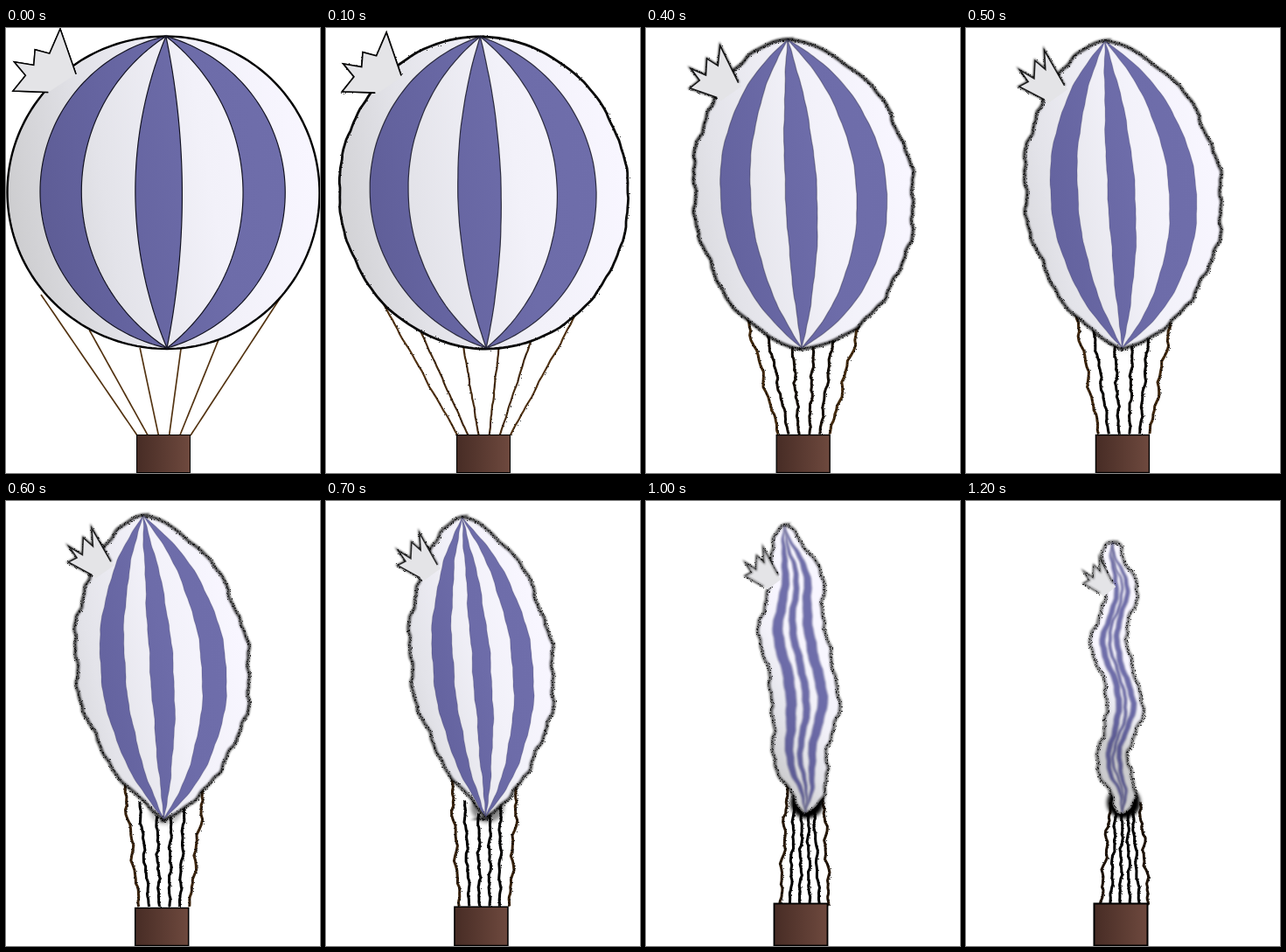
An HTML page with a canvas that plays this animation: 359x509 px, repeating every 1250 ms.

```html
<!DOCTYPE html>
<html lang="en">
<head>
<meta charset="utf-8">
<title>Deflating balloon</title>
<style>
  html, body { margin: 0; width: 100%; height: 100%; overflow: hidden; background: #fff; }
  canvas { display: block; width: 359px; height: 509px; }
</style>
</head>
<body>
<canvas id="stage" width="359" height="509"></canvas>
<script>
const ctx = document.getElementById('stage').getContext('2d');
const LOOP = 1250, STEP = 50, LAST = 24;
const { PI, sin, cos, exp, sqrt, min, max, abs, hypot } = Math;

const mix = (a, b, t) => a + (b - a) * t;
const clamp = x => max(0, min(1, x));
const noise = (v, seed) =>
  (sin(27 * v + seed) + .7 * sin(61 * v + seed * 2.3) + .4 * sin(137 * v + seed * 4.1)) / 1.5;

function random(seed) {
  return () => (seed = seed * 16807 % 2147483647) / 2147483647;
}

// Shape of the envelope; k runs from 0 (full) to 1 (empty).
function envelope(k) {
  const topX = 155 + 64 * (k - .66) ** 2 + 5 * k ** 8;
  const endX = 181 + 3 * cos(9 * k);
  const mid = 181 - 8 * k * k - clamp(1 - 5 * k);
  return {
    topX, endX, mid,
    half: 178.5 - 158.5 * k + 9 * min(0, sin(2 * PI * k)),
    top: 9.5 + 20 * k ** 1.5 + 18 * k ** 10,
    end: 367 - 9 * clamp(3 * k - 1.3),
    bulge: mid - (topX + endX) / 2,
    pinch: .5 + .45 * exp(-(((k - .6) / .2) ** 2)) - .25 * k ** 6,
    wave: 8 * clamp(2.4 * k - 1.4),
    rough: 2.6 * clamp(k * 4)
  };
}

// Height of a circular arc over a chord, scaled to 1 at the centre.
function arc(s, sag) {
  const a = max(sag, .02), r = (1 + a * a) / (2 * a);
  return (sqrt(r * r - s * s) - r + a) / a;
}

function trace(points, close) {
  ctx.beginPath();
  for (const [x, y] of points) ctx.lineTo(x, y);
  if (close) ctx.closePath();
}

function blurred(px, paint) {
  ctx.filter = px > .05 ? `blur(${px}px)` : 'none';
  paint();
  ctx.filter = 'none';
}

// Grainy dots scattered along a line.
function speckle(points, density, spread) {
  const rnd = random(77);
  ctx.fillStyle = 'rgba(0, 0, 0, .8)';
  for (let i = 1; i < points.length; i++) {
    const [x0, y0] = points[i - 1], [x1, y1] = points[i];
    for (let n = hypot(x1 - x0, y1 - y0) * density; n > rnd(); n--) {
      const t = rnd(), jitter = () => (rnd() - .5) * 2 * spread;
      ctx.fillRect(Math.round(mix(x0, x1, t) + jitter()), Math.round(mix(y0, y1, t) + jitter()), 1, 1);
    }
  }
}

function side(fn, steps = 100) {
  return Array.from({ length: steps + 1 }, (_, i) => fn((1 - cos(PI * i / steps)) / 2));
}

function spine(b, v) {
  const sway = b.wave * cos(2 * PI * (v - .16) / .43) * min(1, 8 * v, 8 * (1 - v));
  return mix(b.topX, b.endX, v) + sway;
}

function hull(b) {
  const edge = dir => side(v => {
    const q = max(0, 1 - (2 * v - 1) ** 2);
    const power = v < .5 ? min(b.pinch, .62) : b.pinch;
    const x = spine(b, v) + b.bulge * sqrt(q) + dir * b.half * q ** power;
    return [x + b.rough * noise(v, 2 + dir), mix(b.top, b.end, v) + b.rough * .4 * noise(v, 5 + dir)];
  });
  return edge(-1).concat(edge(1).reverse());
}

function stripeEdge(b, u, wobble, seed) {
  const bow = u * b.half + b.bulge;
  const sag = min(1, max(abs(bow) / (b.end - b.top) * 2, b.wave / 9));
  return side(v => [
    spine(b, v) + bow * arc(2 * v - 1, sag) + wobble * noise(v, seed),
    mix(b.top, b.end - 1, v)
  ]);
}

function shade(b, k, stops) {
  const left = b.mid - b.half * (1 + .5 * clamp(4 * k));
  const g = ctx.createLinearGradient(left, 260, b.mid + b.half, 200);
  stops.forEach((c, i) => g.addColorStop(i / (stops.length - 1), c));
  return g;
}

function drawRopes(b, k) {
  const slack = (1 - k) ** 2;
  const left = 165 - 125 * slack, right = 199 + 117 * slack;
  const y = 305 + 20 * k + 28 * k ** 6;
  [0, .2, .41, .58, .74, 1].forEach((f, i) => {
    const outer = i === 0 || i === 5;
    const x0 = mix(left, right, f), y0 = mix(b.end + 1, y, (2 * f - 1) ** 2) - 8 * k;
    const x1 = mix(150, 154, k) + i * mix(12.2, 11, k), y1 = 466 - 4 * k;
    const line = side(t => [
      mix(x0, x1, t) + b.rough * (outer ? 1 : .6) * noise(t * .6, i * 1.7) * sqrt(sin(PI * t)),
      mix(y0, y1, t)
    ], 40);
    const tint = outer ? 1 - .6 * k : clamp(1 - 2.2 * k);
    trace(line);
    ctx.strokeStyle = `rgb(${84 * tint}, ${52 * tint}, ${18 * tint})`;
    ctx.lineWidth = 1.7 + 1.3 * clamp(k * 4);
    ctx.stroke();
    speckle(line, .6 * clamp(k * 4), 2);
  });
}

function drawBasket(k) {
  const x = 149.5 - 3 * clamp(3 * k - .9), y = 465.5 - 5 * clamp(3 * k - 1.5);
  const g = ctx.createLinearGradient(x, 0, x + 61, 0);
  g.addColorStop(0, '#472c25');
  g.addColorStop(1, '#6e493e');
  ctx.fillStyle = g;
  ctx.strokeStyle = '#000';
  ctx.lineWidth = 1 + k;
  blurred(k * .7, () => {
    ctx.fillRect(x, y, 61, 508.5 - y);
    ctx.strokeRect(x, y, 61, 508.5 - y);
  });
}

function rim(points, k, width, close) {
  trace(points, close);
  ctx.strokeStyle = `rgba(0, 0, 0, ${1 - .45 * k})`;
  ctx.lineWidth = width + 1.2 * clamp(k * 4);
  blurred(min(1.1, k * 2.4), () => ctx.stroke());
  speckle(points, .9 * clamp(k * 4), 2.2);
}

function drawSoot(b, k) {
  ctx.fillStyle = `rgba(0, 0, 0, ${clamp(2.5 * k - 1)})`;
  ctx.beginPath();
  ctx.ellipse(b.endX + 2, b.end - 13, 19, 18, 0, 0, 2 * PI);
  blurred(2, () => ctx.fill());
}

function drawStripes(b, k) {
  const full = [-.79, -.525, -.18, .12, .51, .78];
  const thin = [-.5, -.16, -.04, .14, .28, .6];
  const edges = full.map((u, i) => stripeEdge(b, mix(u, thin[i], k * k), 1.4 * k, 1 + (i >> 1) * 1.3));
  ctx.strokeStyle = `rgba(20, 20, 35, ${mix(1, .15, clamp(k * 2.4))})`;
  ctx.lineWidth = 1.2;
  ctx.fillStyle = shade(b, k, ['#5a5990', '#64639f', '#6d6ca9', '#6f6eab']);
  for (let i = 0; i < 6; i += 2) {
    trace(edges[i].concat(edges[i + 1].reverse()), true);
    blurred(k, () => { ctx.fill(); ctx.stroke(); });
  }
}

function drawBalloon(b, k) {
  const outline = hull(b);
  trace(outline, true);
  ctx.fillStyle = shade(b, k, ['#cbcbcd', '#e3e3e9', '#f2f1f9', '#f8f6ff']);
  ctx.fill();
  rim(outline, k, 2.4, true);
  drawStripes(b, k);
}

// The torn flap: three tips that lean left as the air escapes.
function drawFlap(k) {
  const lean = clamp(4 * k - .7);
  const x = 8 + 127 * k, y = 1 + 65 * k ** 1.1, w = 72 * .45 ** k, h = 74 * .54 ** k;
  const points = [
    [.56, .98], [0, .96 - .25 * lean], [.2, .72 - .1 * lean], [.02, .51 - .12 * lean], [.33, .56],
    [.35, .32 - .12 * lean], [.58, .38], [.75 - .2 * lean, 0], [1, .7]
  ].map(([px, py]) => [x + px * w, y + py * h]);
  const [a] = points, z = points[points.length - 1], inset = 4 * clamp(k * 4);
  rim(points, k, 1.5);
  trace([...points, [z[0] + inset, z[1] + inset], [a[0] + inset, a[1] + inset]], true);
  ctx.fillStyle = '#e4e4e7';
  ctx.fill();
  trace(points);
  ctx.lineWidth = 1.5;
  blurred(k, () => ctx.stroke());
}

function draw(n) {
  const k = n / LAST, b = envelope(k);
  ctx.fillStyle = '#fff';
  ctx.fillRect(0, 0, 359, 509);
  drawRopes(b, k);
  drawBasket(k);
  drawSoot(b, k);
  drawBalloon(b, k);
  drawFlap(k);
}

let shown = -1;
function tick(now) {
  const n = Math.floor(now % LOOP / STEP);
  if (n !== shown) draw(shown = n);
  requestAnimationFrame(tick);
}
draw(0);
requestAnimationFrame(tick);
</script>
</body>
</html>
```
